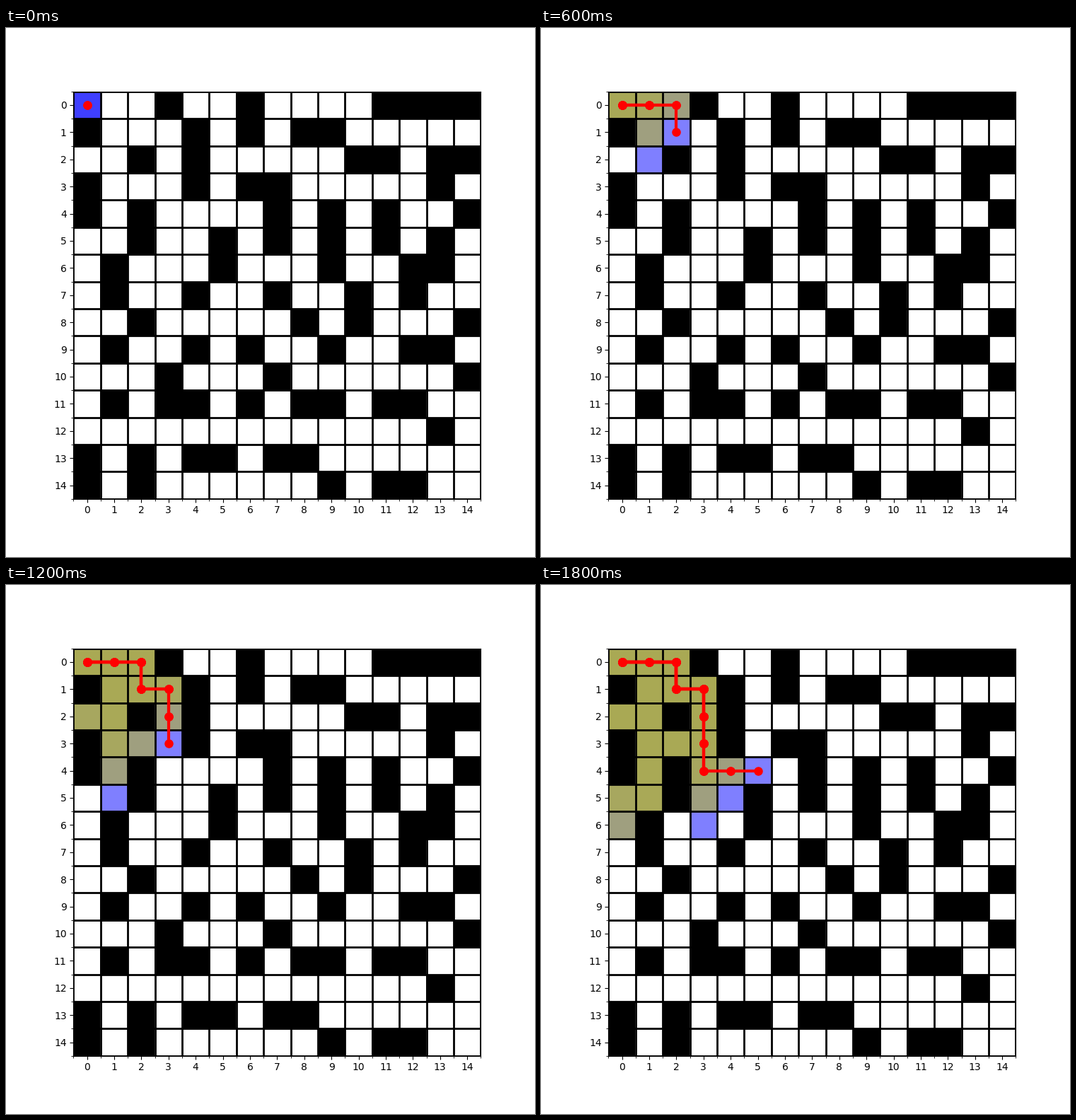
These frames come from a looping animation (748 px wide and 748 px high, 2000 ms). A matplotlib script:

```python
import numpy as np
import matplotlib.pyplot as plt
from matplotlib.animation import FuncAnimation

MAZE = """
...#..#....####
#...#.#.##.....
..#.#.....##.##
#...#.##.....#.
#.#....#.#.#..#
..#..#.#.#.#.#.
.#...#...#..##.
.#..#..#..#.#..
..#.....#.#...#
.#..#.#..#..##.
...#...#......#
.#.##.#.##.##..
.............#.
#.#.##.##......
#.#......#.##..
""".split()
SIZE = len(MAZE)
STEPS = 10
CELL_LIMIT = 22
PATH = [(0, 0), (1, 0), (2, 0), (2, 1), (3, 1),
        (3, 2), (3, 3), (3, 4), (4, 4), (5, 4)]


def search(start, limit):
    """Breadth-first distances of the first `limit` cells reached."""
    dist = {start: 0}
    queue = [start]
    for x, y in queue:
        for dx, dy in ((1, 0), (0, 1), (-1, 0), (0, -1)):
            cell = cx, cy = x + dx, y + dy
            if not (0 <= cx < SIZE and 0 <= cy < SIZE):
                continue
            if MAZE[cy][cx] == "#" or cell in dist:
                continue
            if len(dist) == limit:
                return dist
            dist[cell] = dist[(x, y)] + 1
            queue.append(cell)
    return dist


fig, ax = plt.subplots(figsize=(7.48, 7.48), dpi=100)
walls = np.array([[c == "#" for c in row] for row in MAZE], dtype=float)
ax.imshow(walls, cmap="binary")
ax.set_xticks(range(SIZE))
ax.set_yticks(range(SIZE))
edges = np.arange(-0.5, SIZE, 1)
ax.set_xticks(edges, minor=True)
ax.set_yticks(edges, minor=True)
ax.grid(which="minor", color="black", linestyle="-", linewidth=2)


def tint(cell, color):
    x, y = cell
    return ax.add_patch(plt.Rectangle((x - 0.5, y - 0.5), 1, 1, facecolor=color,
                                      alpha=0.5, linewidth=0))


def make_layer(step):
    """Blue on every reached cell, yellow on the expanded ones, then the path."""
    layer = [tint(c, "blue") for c, d in dist.items() if d <= step]
    layer += [tint(c, "yellow") for c, d in dist.items() if d < step]
    xs, ys = zip(*PATH[:step + 1])
    layer += ax.plot(xs, ys, "ro-", linewidth=3, markersize=8)
    return layer


dist = search(PATH[0], CELL_LIMIT)
# Layers pile up over time; the first one is laid down twice.
layers = [(step, make_layer(step)) for step in [0, *range(STEPS)]]
ax.set_xlim(-0.5, SIZE - 0.5)
ax.set_ylim(SIZE - 0.5, -0.5)


def update(frame):
    for step, layer in layers:
        for artist in layer:
            artist.set_visible(step <= frame)
    return []


anim = FuncAnimation(fig, update, frames=STEPS, interval=200,
                     repeat=True, repeat_delay=0)
plt.show()
```
